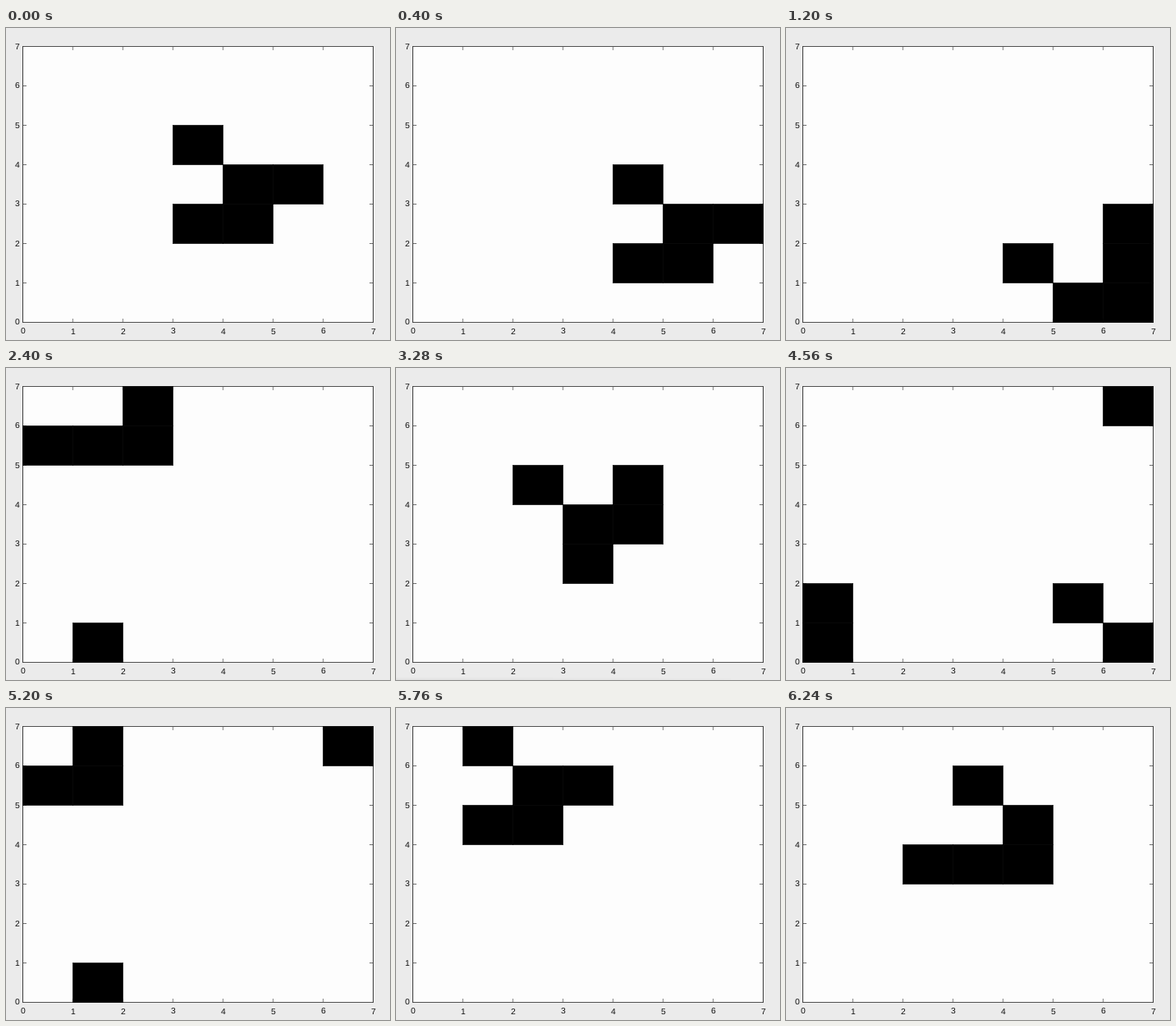
Animation, 468 px wide and 380 px high, one loop 6.48 s. Source, as a matplotlib script:

```python
import numpy as np
import matplotlib.pyplot as plt
from matplotlib.animation import FuncAnimation
from matplotlib.patches import Rectangle

plt.rcParams["text.hinting"] = "none"

W, H, DPI = 468, 380, 100
N = 7                      # the board is an N x N torus
LEFT, TOP = 20, 22         # pixel of the axes corner
CW, CH = 61, 48            # cell size
RIGHT, BOTTOM = LEFT + N * CW, TOP + N * CH
TICK = 4
STEP_MS, FRAMES = 80, 81

# The clock runs at about 3 generations per 4 frames, with a few stalls
# after which it jumps ahead: (frame, generation) at each change of pace.
PACE = [(0, 0.35), (8, 6.2), (21, 7.9), (22, 9), (27, 9.9), (28, 15.55),
        (34, 20.75), (60, 40.25), (63, 40.9), (64, 42.79), (78, 53.14)]


def generation(frame):
    return int(np.interp(frame, *zip(*PACE)))


def life(board):
    near = sum(np.roll(board, (dy, dx), (0, 1))
               for dy in (-1, 0, 1) for dx in (-1, 0, 1)) - board
    return ((near == 3) | ((board == 1) & (near == 2))).astype(int)


def history(count):
    board = np.zeros((N, N), int)
    for cell in [(2, 3), (3, 4), (3, 5), (4, 3), (4, 4)]:
        board[cell] = 1
    boards = [board]
    for _ in range(count):
        boards.append(life(boards[-1]))
    return boards


fig = plt.figure(figsize=(W / DPI, H / DPI), dpi=DPI, facecolor="#ebebeb")
ax = fig.add_axes([0, 0, 1, 1])
ax.axis("off")


def box(x, y, w, h, color, z, alpha=1):
    patch = Rectangle((x, y), w, h, facecolor=color, linewidth=0,
                      antialiased=False, zorder=z, alpha=alpha)
    return ax.add_patch(patch)


def label(x, y, text):
    ax.text(x, y, text, family="Liberation Sans", fontsize=10.4 * 72 / DPI,
            color="#101010", ha="center", va="baseline")


# Faint shade that passes along the lower window edge
fall = np.linspace(0.2, 1, 4)[:, None] * np.linspace(1, 0.3, 408)
shade_img = np.zeros((4, 408, 4))
shade_img[..., 3] = 0.05 * fall
shade = ax.imshow(shade_img, extent=(0, 408, H, H - 4), aspect="auto",
                  interpolation="nearest", zorder=0)

box(LEFT, TOP, RIGHT - LEFT + 1, BOTTOM - TOP + 1, "#fdfdfd", 1)
for y in (TOP, BOTTOM):
    box(LEFT, y, RIGHT - LEFT + 1, 1, "#505050", 2)
for x in (LEFT, RIGHT):
    box(x, TOP, 1, BOTTOM - TOP + 1, "#3c3c3c", 2)

for k in range(N + 1):
    x, y = LEFT + k * CW, BOTTOM - k * CH
    if 0 < k < N:
        for ty in (TOP + 1, BOTTOM - TICK):
            box(x, ty, 1, TICK, "#888888", 2)
        for tx in (LEFT + 1, RIGHT - TICK):
            box(tx, y, TICK, 1, "#707070", 2)
    label(x + 0.5, 373, str(k))
    label(13.5, y + 4, str(k))

# A cell is a black core in a slightly soft rim
rims = [box(0, 0, CW + 1, CH + 1, "black", 3, 0.82) for _ in range(5)]
cores = [box(0, 0, CW - 1, CH - 1, "black", 4) for _ in range(5)]
ax.set_xlim(0, W)
ax.set_ylim(H, 0)

boards = history(generation(FRAMES))


def draw(frame):
    live = np.argwhere(boards[generation(frame)])
    for rim, core, (row, col) in zip(rims, cores, live):
        x, y = LEFT + col * CW, TOP + row * CH
        rim.set_xy((x, y))
        core.set_xy((x + 1, y + 1))
    shade.set_alpha(max(0.0, 1 - abs(frame - 43) / 8))
    return rims + cores + [shade]


anim = FuncAnimation(fig, draw, frames=FRAMES, interval=STEP_MS,
                     repeat=True, repeat_delay=0, blit=False)
plt.show()
```
